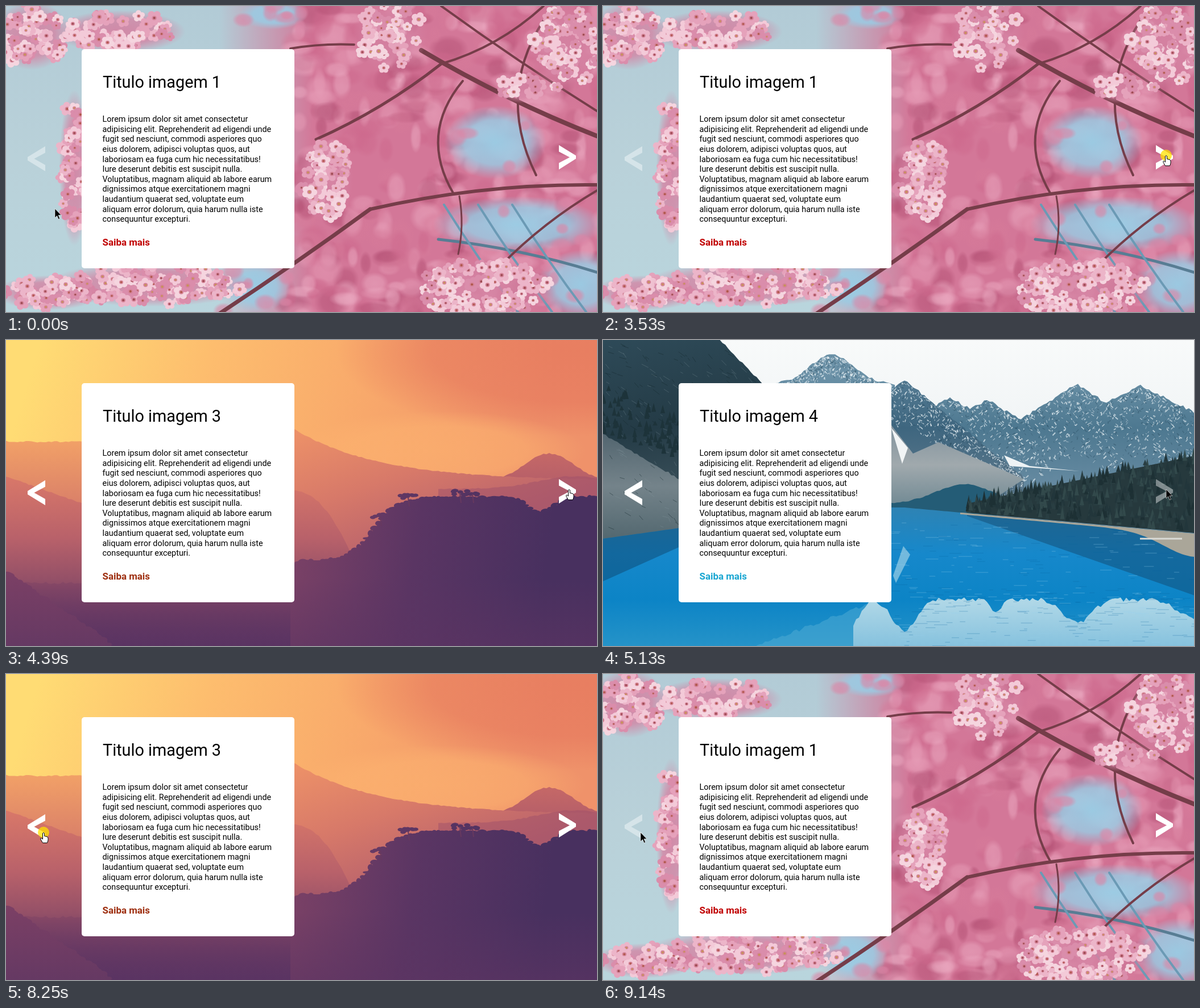
These frames come from a looping animation (1039 by 539 pixels, 9860 ms). An HTML page with a canvas:

```html
<!DOCTYPE html>
<html lang="pt">
<head>
<meta charset="utf-8">
<title>Carrossel</title>
<style>
html, body { margin: 0; width: 100%; height: 100%; overflow: hidden; background: #b9d1d9; }
canvas, svg { position: absolute; left: 0; top: 0; width: 1039px; height: 539px; }
text { font-family: Roboto, "Open Sans", sans-serif; }
#title { font-size: 28.8px; }
#body { font-size: 14.4px; }
#more { font-size: 16.9px; font-weight: 700; }
</style>
</head>
<body>
<canvas id="stage" width="1039" height="539"></canvas>
<svg viewBox="0 0 1039 539">
  <path id="prev" fill="#fff" d="M69 247V258.5L49.5 269 69 280V291L38 272V266Z"/>
  <path id="next" fill="#fff" d="M972 245 1002 263.5V269L972 288V276.5L991 266.5 972 256.5Z"/>
  <rect x="133" y="76" width="374" height="386" rx="5" fill="#fff"/>
  <text id="title" x="170" y="143.5"></text>
  <text id="body"></text>
  <text id="more" x="169.5" y="421.5">Saiba mais</text>
  <circle id="click" r="10" fill="#ffe100" opacity=".75"/>
  <g id="cursor">
    <path id="arrow" stroke="#fff" stroke-width=".6" d="M0 0V16L3.7 12.6 6.2 18.5 8.6 17.5 6.1 11.6H11Z"/>
    <path id="hand" fill="#fff" stroke="#000" d="M-1.5 1.5Q0-.5 1.5 1.5V6.5L6 7.5Q8 8 8 10.5V13.5Q7.5 16 6.5 18.5H-1.5L-5.2 12Q-5.5 9.5-3.5 10.2L-1.5 12Z"/>
    <path id="beam" fill="none" stroke="#000" d="M-3-7.5H-1Q0-7.5 0-6.5V6.5Q0 7.5-1 7.5H-3M3-7.5H1Q0-7.5 0-6.5M0 6.5Q0 7.5 1 7.5H3"/>
  </g>
</svg>
<script>
const W = 1039, H = 539, LOOP = 9860;
const el = id => document.getElementById(id);

// ---------- drawing helpers ----------
let seed = 1;
const rnd = () => {
  seed = seed * 16807 % 2147483647;
  return seed / 2147483647;
};
const span = (a, b) => a + (b - a) * rnd();
const pick = list => list[Math.floor(rnd() * list.length)];
const bump = (x, at, w) => Math.exp(-(((x - at) / w) ** 2));
const tent = (x, at, slope) => Math.abs(x - at) * slope;

function layer(paint) {
  const cv = document.createElement('canvas');
  cv.width = W;
  cv.height = H;
  seed = 4711;
  paint(cv.getContext('2d'));
  return cv;
}
function grad(c, x0, y0, x1, y1, ...colors) {
  const g = c.createLinearGradient(x0, y0, x1, y1);
  colors.forEach((k, i) => g.addColorStop(i / (colors.length - 1), k));
  return g;
}
function fillAll(c, fill) {
  c.fillStyle = fill;
  c.fillRect(0, 0, W, H);
}
function poly(c, fill, ...pts) {
  c.beginPath();
  pts.forEach(p => c.lineTo(...p));
  c.fillStyle = fill;
  c.fill();
}
function line(c, x0, y0, x1, y1, color, width) {
  c.beginPath();
  c.moveTo(x0, y0);
  c.lineTo(x1, y1);
  c.strokeStyle = color;
  c.lineWidth = width;
  c.stroke();
}
// everything between height(x) and floor(x)
function hill(c, x0, x1, height, fill, rough = 0, floor = () => H) {
  const top = [], bottom = [];
  for (let x = x0; x < x1 + 5; x += 5) {
    top.push([x, height(x) + span(-rough, rough)]);
    bottom.unshift([x, floor(x)]);
  }
  poly(c, fill, ...top, ...bottom);
}
function dot(c, x, y, rx, ry, fill) {
  c.beginPath();
  c.ellipse(x, y, rx, ry, 0, 0, 7);
  c.fillStyle = fill;
  c.fill();
}
function glow(c, x, y, rx, ry, rgb, a) {
  c.save();
  c.translate(x, y);
  c.scale(rx, ry);
  const g = c.createRadialGradient(0, 0, 0, 0, 0, 1);
  g.addColorStop(0, `rgba(${rgb},${a})`);
  g.addColorStop(.6, `rgba(${rgb},${a * .85})`);
  g.addColorStop(1, `rgba(${rgb},0)`);
  c.fillStyle = g;
  c.fillRect(-1, -1, 2, 2);
  c.restore();
}

// ---------- slide 1: blossoms ----------
function branch(c, width, color, x0, y0, x1, y1, bend) {
  const len = Math.hypot(x1 - x0, y1 - y0);
  c.beginPath();
  c.moveTo(x0, y0);
  c.quadraticCurveTo((x0 + x1) / 2 - (y1 - y0) / len * bend, (y0 + y1) / 2 + (x1 - x0) / len * bend, x1, y1);
  c.lineCap = 'round';
  c.lineWidth = width;
  c.strokeStyle = color;
  c.stroke();
}
function flower(c, x, y, r) {
  const turn = rnd() * 6.3, tone = pick(['#f3cad8', '#ecb5c9', '#e5a2bb', '#f5d5df', '#da8dab']);
  for (let i = 0; i < 5; i++) {
    const a = turn + i * 1.2566;
    dot(c, x + Math.cos(a) * r * .6, y + Math.sin(a) * r * .55, r * .46, r * .43, tone);
  }
  dot(c, x, y, r * .3, r * .28, '#d58499');
  dot(c, x, y, r * .15, r * .15, pick(['#9d4a52', '#c79258', '#b0584c']));
}
function cluster(c, x, y, rx, ry) {
  glow(c, x, y, rx * 1.1, ry * 1.1, '212,130,162', .9);
  for (let i = 0; i < rx * ry / 65; i++) {
    const a = rnd() * 6.3, d = Math.sqrt(rnd());
    flower(c, x + Math.cos(a) * d * rx, y + Math.sin(a) * d * ry, span(8, 14));
  }
}
function blossoms(c) {
  fillAll(c, grad(c, 0, 0, 0, H, '#b2cbd6', '#b9d1d9', '#b9d5dd'));
  fillAll(c, grad(c, 375, 0, 540, 0, 'rgba(211,119,152,0)', '#d37798'));
  for (let i = 0; i < 420; i++)
    glow(c, span(500, 1060), span(-10, 550), span(10, 36), span(10, 30),
      pick(['231,158,184', '205,104,140', '178,78,114', '236,172,195', '214,122,153']), .55);
  const sky = [[860, 240, 90, 65], [900, 385, 150, 50], [1010, 490, 75, 60], [470, 15, 60, 26], [440, 495, 60, 45]];
  for (const [x, y, rx, ry] of sky) {
    glow(c, x, y, rx, ry, '152,205,229', .95);
    for (let i = 0; i < 7; i++)
      glow(c, x + span(-rx, rx), y + span(-ry, ry), span(10, 24), span(8, 18), '219,134,166', .7);
  }
  const far = '#587d94', wood = '#753d49';
  branch(c, 5, far, 760, 411, 1039, 469, -14);
  for (let i = 0; i < 3; i++)
    branch(c, 4, '#6b9ab5', 770 + i * 60, 350, 900 + i * 60, H, 5);
  const limbs = [
    [8, 730, 78, 1039, 229, 14], [5, 765, 102, 545, 235, -16], [4, 765, 102, 945, 0, 24],
    [4, 765, 0, 1039, 185, 6], [4, 957, 8, 932, 298, 88], [4, 803, 132, 787, 331, 70],
    [7, 375, 542, 640, 358, 4], [6, 640, 358, 1039, 315, -24], [4, 870, 457, 1039, 325, -14],
    [4, 500, 75, 612, 68, -6], [3, 797, 335, 795, 437, -10]
  ];
  limbs.forEach(([w, ...rest]) => branch(c, w, wood, ...rest));
  const bunches = [
    [45, 52, 62, 55], [200, 45, 105, 34], [120, 285, 24, 125], [75, 505, 85, 28], [255, 490, 165, 36],
    [560, 305, 46, 68], [675, 52, 60, 58], [985, 75, 60, 72], [905, 145, 36, 24], [840, 497, 118, 48]
  ];
  bunches.forEach(b => cluster(c, ...b));
}

// ---------- slide 2: soft tones ----------
function haze(c) {
  fillAll(c, grad(c, 0, 0, 0, H, '#c9c4c6', '#a99ca8', '#6f6f83'));
}

// ---------- slide 3: sunset hills ----------
function sunset(c) {
  fillAll(c, grad(c, 60, 0, 900, 260, '#ffdc74', '#fdbd6e', '#f8a86b', '#ef926a'));
  glow(c, 1000, 20, 420, 150, '229,118,93', .7);
  glow(c, 760, 195, 260, 70, '253,180,112', .6);
  hill(c, 0, 510, () => 179, grad(c, 0, 175, 0, 440, '#f2a167', '#d67b69', '#a6576a'), 1.5);
  hill(c, 760, W, x => 250 - 50 * bump(x, 955, 62), grad(c, 0, 200, 0, 310, '#c56867', '#a4546a'), 1);
  hill(c, 500, W, x => 248 - 95 * Math.exp((500 - x) / 150),
    grad(c, 560, 150, 640, 390, '#ec9068', '#d77969', '#b8626c'), .8);
  hill(c, 760, W, x => 262 - 22 * bump(x, 1000, 90), 'rgba(160,80,107,.5)', 1);
  const slope = grad(c, 0, 240, 0, 460, '#d97869', '#b8616a', '#814766');
  hill(c, 0, 135, x => 240 + x * .36, slope, 1);
  hill(c, 505, 620, x => 265 + ((x - 507) / 105) ** 2 * 125, slope, 1);
  hill(c, 0, 510, () => 428, grad(c, 0, 420, 0, H, '#8b4a66', '#703d64', '#573362'), 2);
  const shade = grad(c, 480, 400, 940, 470, '#7d4266', '#5a3563', '#48305f');
  const crest = x => 392 - 113 / (1 + Math.exp((645 - x) / 22)) + 26 * bump(x, 940, 30);
  hill(c, 500, W, crest, shade, 2);
  for (let x = 515; x < W; x += 7)
    dot(c, x, crest(x), span(4, 10), span(2, 6), shade);
  for (const x of [658, 707, 798, 820]) {
    for (let i = 0; i < 9; i++)
      dot(c, x + span(-14, 14), crest(x) + span(-14, -6), 5, 3, shade);
    line(c, x, crest(x) - 8, x + 2, crest(x) + 8, '#67395f', 2);
  }
  fillAll(c, grad(c, 0, 420, 0, H, 'rgba(92,52,98,0)', 'rgba(92,52,98,.6)'));
  const near = grad(c, 0, 400, 0, H, '#7d4065', '#653963'), edge = x => 412 + x * .69;
  hill(c, 0, 185, edge, near, 3);
  for (let x = 0; x < 185; x += 6)
    dot(c, x, edge(x), span(4, 11), span(3, 7), near);
}

// ---------- slide 4: mountain lake ----------
function peak(c, x0, x1, height, fill, depth) {
  hill(c, x0, x1, height, fill, 2.5);
  for (let i = 0; i < (x1 - x0) * 3; i++) {
    const x = span(x0, x1), y = height(x) + rnd() ** 1.6 * depth + 2;
    const color = pick(['rgba(238,245,248,.7)', 'rgba(238,245,248,.6)', 'rgba(42,78,98,.4)']);
    line(c, x, y, x + span(-5, 5), y + span(1, 5), color, span(.6, 2));
  }
}
function tree(c, x, y, h, fill) {
  poly(c, fill, [x, y - h], [x + 4, y], [x - 4, y]);
}
function lake(c) {
  fillAll(c, grad(c, 0, 0, 0, 220, '#f8fafa', '#eef2f4'));
  const rock = grad(c, 0, 60, 0, 250, '#6b91a7', '#4d7890', '#6489a0');
  peak(c, 278, 510, x => 78 - 52 * bump(x, 402, 55), rock, 35);
  peak(c, 550, W, x => Math.min(102 + tent(x, 610, .55), 105 + tent(x, 675, .6),
    77 + tent(x, 832, .65), 80 + tent(x, 945, .5)), rock, 120);
  peak(c, 500, 740, x => 70 + tent(x, 530, .82), grad(c, 0, 70, 0, 240, '#547b93', '#3e667f', '#577589'), 70);
  poly(c, grad(c, 0, 150, 0, 290, '#80929d', '#a0a9ad', '#728a94'),
    [507, 150], [545, 200], [590, 180], [740, 245], [660, 298], [507, 298]);
  poly(c, '#f1f4f5', [507, 155], [536, 190], [526, 218]);
  poly(c, '#eef3f5', [705, 203], [750, 222], [838, 231], [715, 222]);
  hill(c, 507, 690, x => 288 - 34 * bump(x, 635, 70), '#245c76', 1);
  // left slope
  hill(c, 0, 400, x => Math.max(-5, (x - 206) * 1.03), grad(c, 0, 0, 60, 330, '#2e4a58', '#243b46', '#435862'), 2);
  hill(c, 0, 135, x => 165 + x * .6, grad(c, 0, 165, 0, 350, '#52656f', '#74838a', '#536870'), 2);
  for (let i = 0; i < 260; i++) {
    const x = span(0, 280), y = span(Math.max(0, x - 200), 330);
    line(c, x, y, x + span(3, 12), y + span(2, 9), pick(['rgba(18,38,44,.45)', 'rgba(135,155,164,.3)']), 1);
  }
  for (let i = 0; i < 80; i++) {
    const x = span(0, 134);
    tree(c, x, span(85, 165) + x * .35, span(8, 20), '#1d333a');
  }
  // water and reflections
  const shore = x => x < 320 ? 350 - x * .14 : Math.max(295, 305 + (x - 640) * .09);
  hill(c, 0, W, shore, grad(c, 0, 295, 0, H, '#2e83b4', '#1688cb', '#0c84c6', '#2593c8'));
  hill(c, 0, 135, shore, 'rgba(14,65,102,.45)', 0, x => 425 - x * .45);
  hill(c, 640, W, shore, 'rgba(18,76,117,.5)', 0, x => 310 + (x - 640) * .35);
  poly(c, 'rgba(155,207,229,.7)', [510, 415], [528, 363], [540, 378], [515, 428]);
  hill(c, 270, 470, x => 539 - (x - 270) * .38, 'rgba(82,173,214,.5)', 3);
  const mirror = x => 457 + 55 * bump(x, 530, 30) + 42 * bump(x, 835, 34) + 32 * bump(x, 1039, 40)
    + 20 * bump(x, 690, 14) + Math.max(0, 470 - x) * 1.5;
  hill(c, 440, W, mirror, grad(c, 0, 450, 0, H, '#b5dae8', '#86c2de'), 4);
  for (let i = 0; i < 420; i++) {
    const x = span(500, W), y = i % 3 ? span(320, H) : mirror(x) + span(-14, 24);
    line(c, x, y, x + span(5, 24), y, pick(['rgba(150,208,234,.25)', 'rgba(8,96,156,.22)']), 1.4);
  }
  // forest
  hill(c, 628, W, shore, '#aaa699', 0, x => shore(x) + 3 + 38 * bump(x, 1039, 75));
  hill(c, 640, W, x => 288 - (x - 640) * .21, '#26393d', 0, x => shore(x) - 1);
  for (let i = 0; i < 430; i++) {
    const x = span(640, W), y = span(292 - (x - 640) * .23, shore(x) - 1);
    tree(c, x, y, span(9, 24), pick(['#1d3034', '#293e42', '#32494b', '#22363b']));
  }
  line(c, 944, 350, 1018, 350, '#d9dad5', 3);
}

// ---------- timeline ----------
const slides = [null, blossoms, haze, sunset, lake].map(p => p && layer(p));
const accents = [, '#c00000', '#7d4a66', '#9d2d0e', '#17a5d1'];
// click, start of blend, change, new slide
const turns = [[3530, 3600, 3600, 2], [4270, 4330, 4390, 3], [5000, 5065, 5130, 4],
  [7650, 7720, 7790, 3], [8250, 8400, 8400, 2], [8980, 9060, 9140, 1]];
// start, end, steps, ease-out power, control point, end point
const home = [86, 357];
const moves = [
  [790, 1740, 15, 1, [46, 243], [48, 267]],
  [1810, 2780, 15, 1, [400, 330], [843, 272]],
  [2850, 3330, 8, 2, [940, 268], [990, 263]],
  [5660, 6620, 15, 1, [1040, 220], [598, 300]],
  [6710, 7450, 12, 2, [206, 289], [66, 279]]
];

function position(t) {
  let pos = 1;
  for (const [, blend, change, slide] of turns) {
    if (t >= change) pos = slide;
    else if (t >= blend) pos = (pos + slide) / 2;
  }
  return pos;
}
function pointer(t) {
  let from = home;
  for (const [a, b, n, power, mid, to] of moves) {
    if (t < a) break;
    const step = Math.min(n, Math.floor((t - a) / (b - a) * (n - 1)) + 1);
    const q = 1 - (1 - step / n) ** power, r = 1 - q;
    from = from.map((v, d) => r * r * v + 2 * r * q * mid[d] + q * q * to[d]);
  }
  return from;
}
function pointerKind(x, y, slide) {
  if (y > 244 && y < 293) {
    if (x > 36 && x < 72 && slide > 1) return 'hand';
    if (x > 970 && x < 1004 && slide < 4) return 'hand';
  }
  return x > 168 && x < 470 && y > 190 && y < 385 ? 'beam' : 'arrow';
}

const lines = ['Lorem ipsum dolor sit amet consectetur', 'adipisicing elit. Reprehenderit ad eligendi unde',
  'fugit sed nesciunt, commodi asperiores quo', 'eius dolorem, adipisci voluptas quos, aut',
  'laboriosam ea fuga cum hic necessitatibus!', 'Iure deserunt debitis est suscipit nulla.',
  'Voluptatibus, magnam aliquid ab labore earum', 'dignissimos atque exercitationem magni',
  'laudantium quaerat sed, voluptate eum', 'aliquam error dolorum, quia harum nulla iste',
  'consequuntur excepturi.'];
el('body').innerHTML = lines.map((s, i) =>
  `<tspan x="169.5" y="${204 + i * 17.63}">${s}</tspan>`).join('');

const ctx = el('stage').getContext('2d');
let shown = 0;
function show(pos) {
  if (pos === shown) return;
  shown = pos;
  const low = Math.floor(pos), slide = Math.round(pos);
  ctx.globalAlpha = 1;
  ctx.drawImage(slides[low], 0, 0);
  if (pos > low) {
    ctx.globalAlpha = pos - low;
    ctx.drawImage(slides[low + 1], 0, 0);
  }
  el('title').textContent = 'Titulo imagem ' + slide;
  el('more').setAttribute('fill', accents[slide]);
  el('prev').setAttribute('opacity', slide === 1 ? .4 : 1);
  el('next').setAttribute('opacity', slide === 4 ? .42 : 1);
}
function render(t) {
  const pos = position(t);
  show(pos);
  const [x, y] = pointer(t), kind = pointerKind(x, y, Math.round(pos));
  el('cursor').setAttribute('transform', `translate(${x} ${y})`);
  for (const id of ['arrow', 'hand', 'beam'])
    el(id).style.display = id === kind ? '' : 'none';
  const pressed = turns.some(([click, , change]) => t >= click && t < change);
  el('click').style.display = pressed ? '' : 'none';
  el('click').setAttribute('cx', x);
  el('click').setAttribute('cy', y);
}
const start = performance.now();
function tick() {
  render((performance.now() - start) % LOOP);
  requestAnimationFrame(tick);
}
tick();
</script>
</body>
</html>
```
